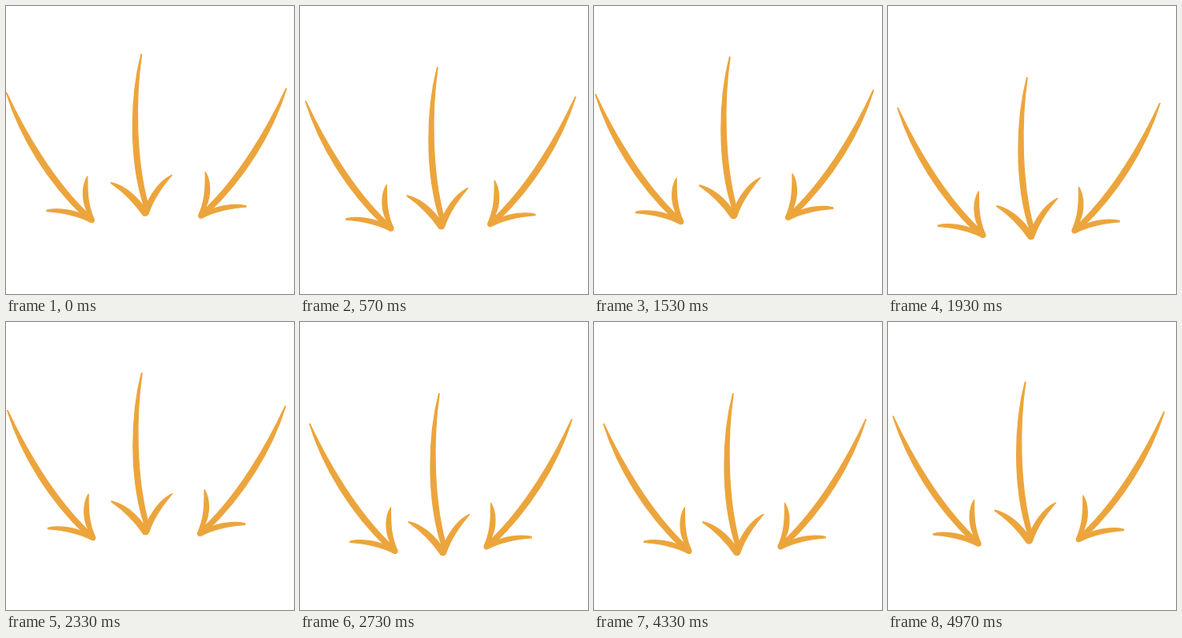
An HTML page that plays this animation: 360x360 px, repeating every 5000 ms.

```html
<!DOCTYPE html>
<html lang="en">
<head>
<meta charset="utf-8">
<title>Arrows</title>
<style>
  html, body { margin: 0; width: 100%; height: 100%; overflow: hidden; background: #fff; }
  svg { display: block; width: 100%; height: 100%; }
</style>
</head>
<body>
<svg viewBox="0 0 360 360" fill="#eca53c" stroke="#eca53c" stroke-width="1.3" stroke-linejoin="round">
  <defs>
    <g id="side">
      <path d="M.3 108.5 C18 165 52 220 99 265 L102 259 C60 219 24 158 .9 108.5Z"/>
      <path d="M51 255.2 C65 252 83 254.5 98 261.5 L101 256 C94.5 242 95 224 101.8 213 C101.5 235 102.5 250 110.3 267 Q110.5 271.3 106 270.4 C89 261.5 70 258 51 256.6Z"/>
    </g>
  </defs>
  <g id="left"><use href="#side"/></g>
  <g id="middle">
    <path d="M168.9 60.5 C156 110 152.5 190 173 252 L177.2 247 C162 190 161.5 115 169.6 60.5Z"/>
    <path d="M131.3 220.6 C146 224 160 235 171 249 L176.5 246 C184 231 195 217 207.4 211.3 C196 225 184.5 240 177.8 260 Q176 263.4 171.6 262 C160 245 146 231.5 131.3 221.4Z"/>
  </g>
  <g id="right"><use href="#side" transform="translate(351 -5.4) scale(-1 1)"/></g>
</svg>
<script>
  const LOOP = 5000;
  const POSES = 20;   // poses in one bounce
  const PEAK = 9;     // pose with the largest shift
  const REST = 19;    // pose back at the start

  // Shift of each arrow at the peak
  const travel = {
    left: [13, 21.2],
    middle: [5.2, 32.8],
    right: [-12, 21]
  };
  const arrows = Object.entries(travel).map(([id, shift]) => [document.getElementById(id), shift]);

  // The bounce has 25 poses a second, shown at 30 pictures a second
  function poseAt(time) {
    const tick = Math.floor(time / 10) * 10;
    const picture = Math.floor((tick + 4) * 0.03);
    return Math.floor(picture * 5 / 6) % POSES;
  }

  function render(time) {
    const pose = poseAt(time % LOOP);
    const amount = pose <= PEAK ? pose / PEAK : (REST - pose) / (REST - PEAK);
    for (const [arrow, [dx, dy]] of arrows) {
      arrow.setAttribute("transform", `translate(${dx * amount} ${dy * amount})`);
    }
  }

  const start = performance.now();
  function loop() {
    render(performance.now() - start);
    requestAnimationFrame(loop);
  }
  loop();
</script>
</body>
</html>
```
